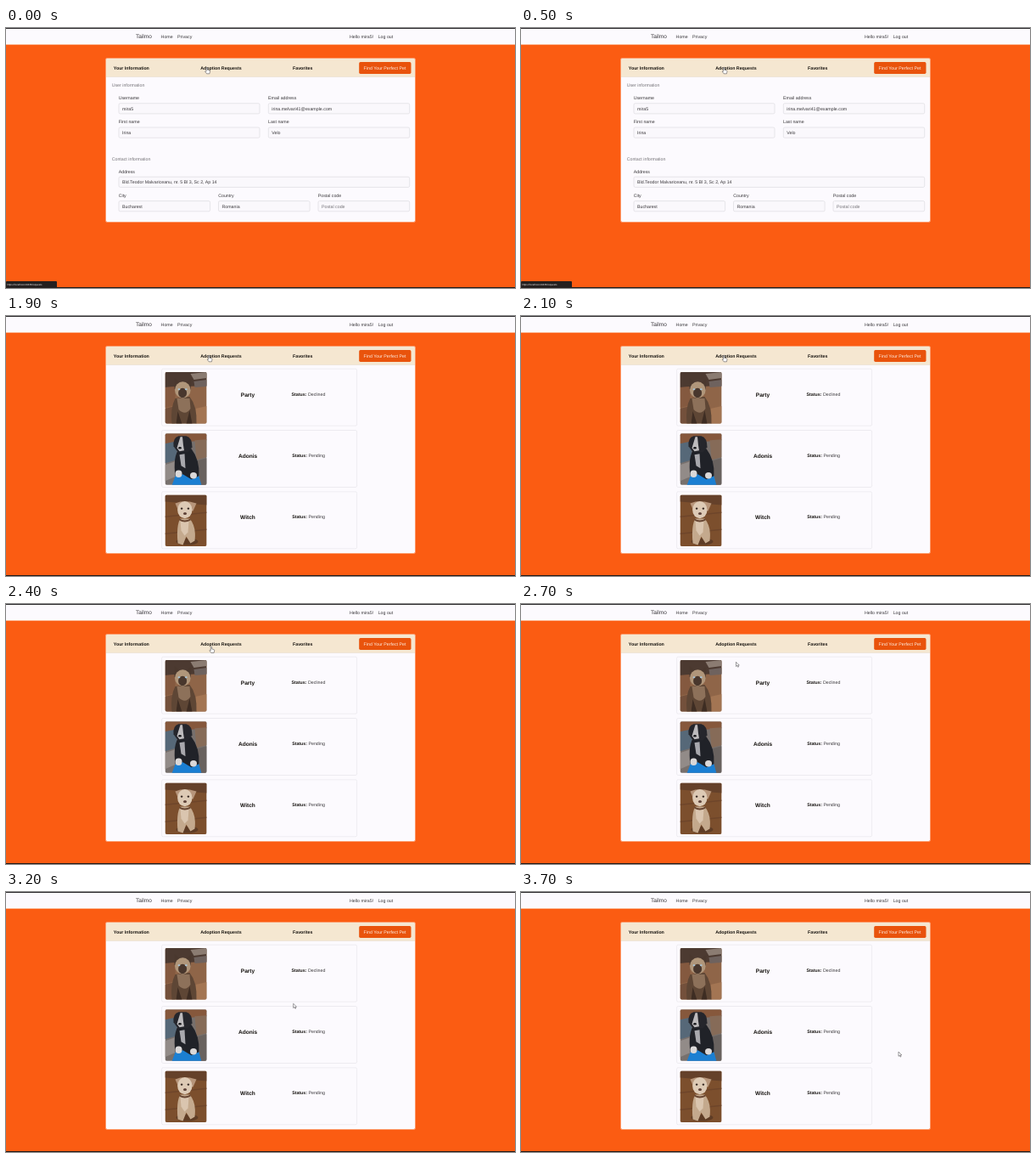
Animation of 600x306 px, one loop 4700 ms. Source, as an HTML page:

```html
<!DOCTYPE html>
<html lang="en">
<head>
<meta charset="utf-8">
<title>Adoption requests</title>
<style>
html, body { margin: 0; width: 100%; height: 100%; overflow: hidden; background: #fb5c12; }
svg { display: block; width: 100%; height: 100%; }
text { font: 5.27px "Liberation Sans", Arial, sans-serif; fill: #3a383b; text-rendering: geometricPrecision; white-space: pre; }
.bold { font-weight: 700; fill: #16130f; }
.big { font-size: 6.55px; }
.muted { fill: #747277; }
.light { fill: #fdeee4; }
.tiny { font-size: 2.92px; fill: #f2efee; }
.mid { text-anchor: middle; }
.field { fill: #faf8fc; stroke: #d9d7dc; stroke-width: .6; }
.row { fill: #fcfafe; stroke: #e5e2e8; stroke-width: .6; }
.edge { fill: none; stroke: #fde3d2; stroke-opacity: .45; }
</style>
</head>
<body>
<svg id="stage" viewBox="0 0 600 306"></svg>
<script>
const LOOP = 4700, STEP = 100, PAGE_AT = 1700, LINK_OFF = 1900, ARROW_AT = 2500;

// time, x, y of the pointer tip
const path = [
  [0, 236.8, 46.3], [300, 239.3, 46.3], [2200, 239.3, 46.3], [2400, 242, 50],
  [2700, 253.5, 68.3], [2800, 262, 75.5], [2900, 275, 86.5], [3200, 338.7, 131.3],
  [3400, 383, 157], [3600, 432, 182], [3700, 445, 188.1]
];

const text = (x, y, s, cls = "") => `<text x="${x}" y="${y}" class="${cls}">${s}</text>`;
const rect = (x, y, w, h, fill, r = 0) =>
  `<rect x="${x}" y="${y}" width="${w}" height="${h}" rx="${r}" fill="${fill}"/>`;
const box = (x, y, w, h, cls) =>
  `<rect x="${x}" y="${y}" width="${w}" height="${h}" rx="1.6" class="${cls}"/>`;
const shape = (d, fill) => `<path d="${d}" fill="${fill}"/>`;
const oval = (x, y, rx, ry, fill) =>
  `<ellipse cx="${x}" cy="${y}" rx="${rx}" ry="${ry}" fill="${fill}"/>`;

const card = h => rect(118, 36, 364, h, "#fcfafe", 1.6) +
  shape("M118 57.5V37.6Q118 36 119.6 36H480.4Q482 36 482 37.6V57.5Z", "#f5e7d1") +
  rect(118, 57.2, 364, .5, "#e2d8ca") +
  box(117.5, 35.5, 365, h + 1, "edge");

const field = (x, y, w, label, value, cls) =>
  text(x - .3, y - 4.6, label) + box(x, y, w, 12.2, "field") + text(x + 4, y + 8.1, value, cls);

const form = card(192) +
  text(124.7, 69, "User information", "muted") +
  field(133, 88.7, 166, "Username", "mira5") +
  field(309.3, 88.7, 166.4, "Email address", "irina.melvari41@example.com") +
  field(133, 117, 166, "First name", "Irina") +
  field(309.3, 117, 166.4, "Last name", "Velo") +
  text(124.7, 155.8, "Contact information", "muted") +
  field(133, 175.2, 342.7, "Address", "Bld.Teodor Malvariceanu, nr. 5 Bl 3, Sc 2, Ap 14") +
  field(133, 203.6, 107.6, "City", "Bucharest") +
  field(250.5, 203.6, 107.6, "Country", "Romania") +
  field(368, 203.6, 107.7, "Postal code", "Postal code", "muted");

const cat = rect(0, 0, 49, 61, "#8f6548") +
  shape("M0 0H49V16L0 18Z", "#4c3a31") +
  shape("M30 2 49 0V7L34 9Z", "#8b7c72") +
  shape("M34 11 49 9V17L35 18Z", "#6e625e") +
  shape("M0 18 12 17V39L0 42Z", "#84593f") +
  shape("M0 43 12 40V61H0Z", "#73503b") +
  shape("M36 43 49 40V61H36Z", "#a37553") +
  shape("M8 61Q6 42 12 31L29 29Q38 40 37 61Z", "#5e4635") +
  shape("M14 31H29L30 43Q24 52 16 44Z", "#8d715a") +
  shape("M13 61 15 46 20 61ZM25 61 29 45 32 61Z", "#3e2d23") +
  shape("M11 20 11 7 17 12H25L31 8 30 21Z", "#4a382e") +
  oval(20.8, 21, 9.3, 9.7, "#b0967a") +
  oval(20.6, 24.5, 5, 5.8, "#49372d") +
  oval(16.5, 20.3, 1.4, 1, "#a7c5d9") + oval(24.8, 20.3, 1.4, 1, "#a7c5d9");

const darkDog = rect(0, 0, 49, 61, "#77706d") +
  shape("M0 0H49V8L0 12Z", "#86583c") +
  shape("M0 12 14 9V31L0 35Z", "#566878") +
  shape("M35 8 49 7V28L37 31Z", "#866b58") +
  shape("M0 37 12 33 14 50 0 56Z", "#928b88") +
  shape("M38 32 49 29V61H42Z", "#69625f") +
  shape("M8 61 13 48 39 47 43 61Z", "#1b7fd2") +
  shape("M12 50Q9 27 17 17L31 18Q41 31 40 50L31 54 21 48Z", "#202228") +
  shape("M17 25 23 24 24 41 19 38Z", "#a8a8ad") +
  shape("M10 15Q9 5 16 3H25Q32 5 32 16L27 22H15Z", "#25262c") +
  shape("M18 4H20.5L21.5 14 22.5 20 17 21 14 17Z", "#bdbbbd") +
  oval(17.5, 17, 1.8, 1.3, "#17171a") +
  oval(16, 47.5, 4, 4.2, "#dad8d8") + oval(33.5, 49.5, 4, 3.7, "#dad8d8");

const paleDog = rect(0, 0, 49, 61, "#7c4f2d") +
  shape("M0 0H49V12L0 8Z", "#65412a") +
  shape("M0 25 49 20V21.5L0 26.5ZM0 45 49 40V41.5L0 46.5Z", "#6e452a") +
  oval(26, 55, 13, 4, "#5e3c25") +
  shape("M15 57Q13 36 18 28H29Q37 37 35 54L30 57 25 49 21 59Z", "#c4a98d") +
  shape("M18 31H28L27 44 23 48 19 42Z", "#dac5af") +
  shape("M15 17 12 10 18 8H29L37 10 33 19Z", "#b7957a") +
  oval(23.3, 17.5, 8.7, 10.2, "#ddcab5") +
  oval(19.6, 16, 1.2, 1.2, "#33251f") + oval(27.4, 16, 1.2, 1.2, "#33251f") +
  oval(23.5, 22, 2, 1.5, "#5d4137") +
  shape("M17 28Q23 32 30 28V30Q23 34 17 30Z", "#674531");

const request = ([photo, name, status], i) => {
  const y = 62.2 + i * 72.3;
  return box(183.6, y, 230, 67, "row") +
    `<g transform="translate(187.5 ${y + 3.8})" clip-path="url(#photo)">${photo}</g>` +
    text(285, y + 32.3, name, "bold big mid") +
    text(356.5, y + 31.6, `<tspan class="bold">Status:</tspan> ${status}`, "mid");
};

const requests = card(243) + [
  [cat, "Party", "Declined"],
  [darkDog, "Adonis", "Pending"],
  [paleDog, "Witch", "Pending"]
].map(request).join("");

const tabs = text(126.8, 48.6, "Your Information", "bold") +
  text(229.3, 48.6, "Adoption Requests", "bold") +
  text(338, 48.6, "Favorites", "bold") +
  rect(416.2, 40, 61.3, 14, "#e9530c", 1.7) +
  text(421.6, 48.8, "Find Your Perfect Pet", "light");

const nav = rect(0, 0, 600, 19, "#fcfafe") + rect(0, 19, 600, 1, "#fcb592") +
  rect(0, 0, 600, 1, "#2c2a2d") +
  text(153, 12.3, "Tailmo", "big") +
  text(182.6, 11.7, "Home") + text(202, 11.7, "Privacy") +
  text(405, 11.7, "Hello mira5!") + text(438.7, 11.7, "Log out");

const outline = 'fill="#fff" stroke="#3a383c" stroke-width=".5" stroke-linejoin="round"';

const stage = document.getElementById("stage");
stage.innerHTML =
  `<clipPath id="photo"><rect width="49.2" height="60.4" rx="2"/></clipPath>` +
  rect(0, 0, 600, 306, "#fb5c12") + nav +
  `<g id="form">${form}</g><g id="requests">${requests}</g>` + tabs +
  rect(0, 305, 600, 1, "#201a19") +
  `<g id="link">${rect(0, 298, 60, 8, "#25201f", 1)}${text(1.4, 303, "https://localhost:44335/requests", "tiny")}</g>` +
  `<g id="pointer">
    <path id="hand" d="M-.7 .7a.7 .7 0 0 1 1.4 0V3L3.2 3.6Q3.9 3.9 3.7 4.8L3.1 7.5H-.2L-2.2 4.7Q-1.8 3.8-.7 4.8Z" ${outline}/>
    <path id="arrow" d="M0 0V5.2L1.3 4.1 2.2 6 3 5.6 2.2 3.8H3.8Z" ${outline}/>
  </g>`;

const part = id => document.getElementById(id);
const [formEl, requestsEl, link, pointer, hand, arrow] =
  ["form", "requests", "link", "pointer", "hand", "arrow"].map(part);
const show = (el, on) => { el.style.display = on ? "" : "none"; };

function pointerAt(t) {
  const i = path.findIndex(p => p[0] > t);
  if (i < 0) return path[path.length - 1].slice(1);
  const [t0, x0, y0] = path[i - 1], [t1, x1, y1] = path[i];
  const k = (t - t0) / (t1 - t0);
  return [x0 + (x1 - x0) * k, y0 + (y1 - y0) * k];
}

function draw(ms) {
  const t = Math.floor(ms % LOOP / STEP) * STEP;
  show(formEl, t < PAGE_AT);
  show(requestsEl, t >= PAGE_AT);
  show(link, t < LINK_OFF);
  show(hand, t < ARROW_AT);
  show(arrow, t >= ARROW_AT);
  pointer.setAttribute("transform", `translate(${pointerAt(t)})`);
}

let start;
function tick(now) {
  start ??= now;
  draw(now - start);
  requestAnimationFrame(tick);
}
draw(0);
requestAnimationFrame(tick);
</script>
</body>
</html>
```
